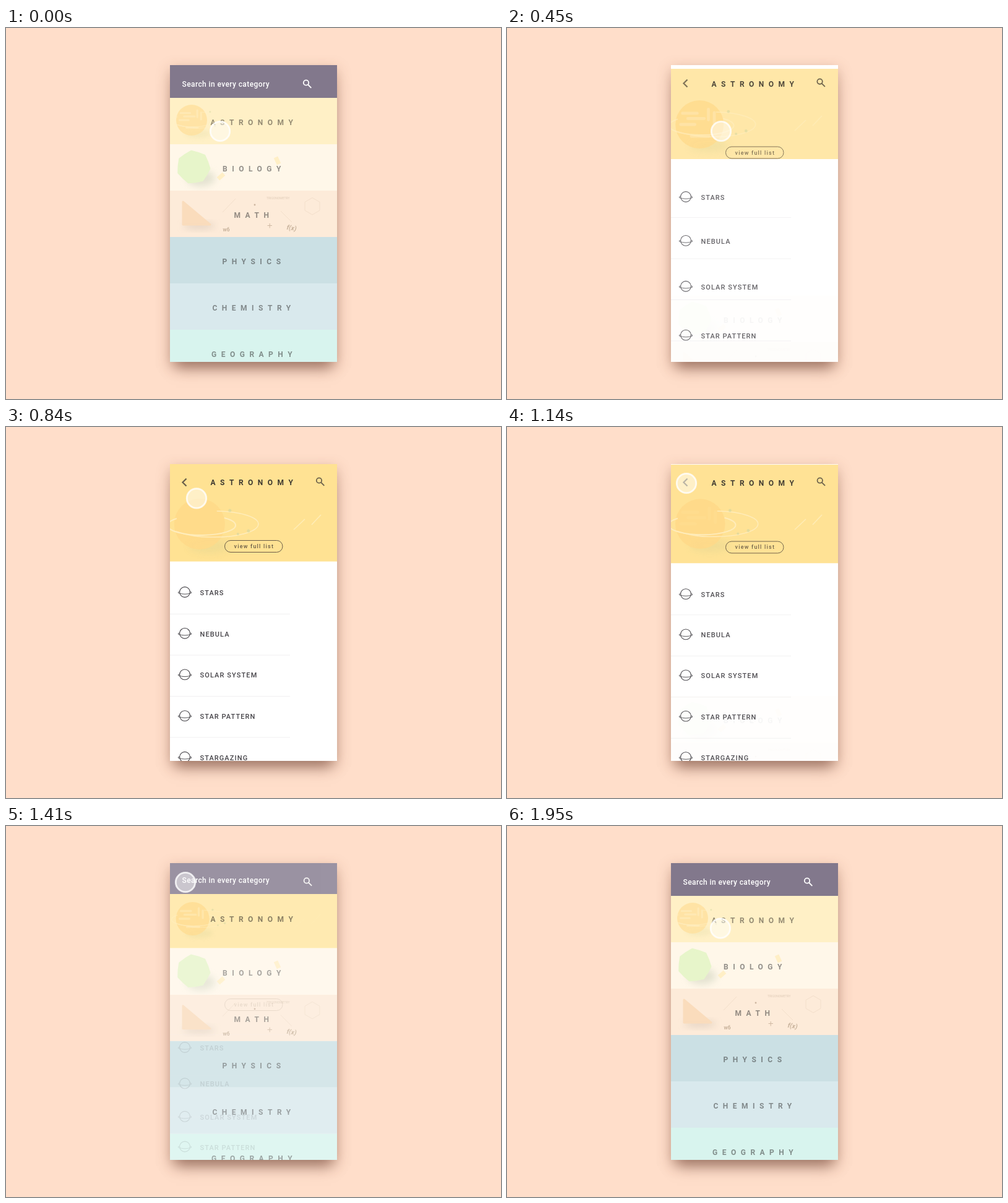
Animation, 800 px wide and 600 px high, one loop 1980 ms. Source, as an HTML page:

```html
<!DOCTYPE html>
<html lang="en">
<head>
<meta charset="utf-8">
<title>Category browser</title>
<style>
  html, body { margin: 0; width: 100%; height: 100%; overflow: hidden; background: #ffdeca; }
  #shadow {
    position: absolute; left: 265px; top: 60px; width: 270px; height: 480px;
    box-shadow: 0 7px 20px rgba(125, 70, 50, .34), 0 20px 22px -10px rgba(95, 55, 45, .5);
  }
  svg { position: absolute; left: 0; top: 0; display: block; }
  text { font-family: Roboto, "Liberation Sans", sans-serif; }
  .name { font-size: 12px; font-weight: 700; letter-spacing: 7.5px; }
  .item { font-size: 11px; font-weight: 500; letter-spacing: 1.1px; fill: #454348; }
  .math { font-weight: 700; fill: #c9b39c; }
</style>
</head>
<body>
<div id="shadow"></div>
<svg width="800" height="600" viewBox="0 0 800 600">
  <defs>
    <clipPath id="screen"><rect x="265" y="60" width="270" height="480"/></clipPath>
    <filter id="soft" x="-60%" y="-60%" width="220%" height="220%"><feGaussianBlur stdDeviation="6"/></filter>
  </defs>
  <g clip-path="url(#screen)">
    <rect x="265" y="60" width="270" height="480" fill="#fff"/>
    <g id="bar">
      <rect x="265" y="50" width="270" height="63" fill="#82788c"/>
      <text x="284.5" y="94.5" font-size="12" font-weight="500" letter-spacing=".4" fill="#fff">Search in every category</text>
    </g>
    <g id="rows"></g>
    <rect id="block" x="265" width="270" fill="#ffe293"/>
    <g clip-path="url(#blockClip)">
      <clipPath id="blockClip"><rect id="blockMask" x="265" width="270"/></clipPath>
      <g id="planet">
        <ellipse cx="16" cy="36" rx="34" ry="11" fill="#cfcf92" opacity=".3" filter="url(#soft)"/>
        <circle r="41" fill="#ffd988" opacity=".85"/>
        <g id="bands" stroke="#ffebbd" stroke-width="5" stroke-linecap="round">
          <path d="M-29-19H-4M-20-10H8M-32 0H-8M-14 20H16M15-26V-8M25-20V-2"/>
        </g>
        <g id="rings" fill="none" stroke="#fff0c6" stroke-width="2">
          <path d="M-37-9A55 16 0 1 0 40-10"/>
          <path d="M28-21A70 21 0 0 1 22 21Q-8 22-38 12" stroke-width="1.5"/>
        </g>
        <g fill="#d3d6a0" opacity=".7">
          <circle cx="49" cy="-22" r="2.5"/><circle cx="79" cy="11" r="2.5"/><circle cx="62" cy="16" r="2"/>
        </g>
      </g>
      <path id="meteors" d="M465 166L483 149M494 158L509 142" stroke="#fff0c2" stroke-width="1.5"/>
    </g>
    <text id="title" class="name" x="330.5" fill="#3f3a30">ASTRONOMY</text>
    <g id="list"></g>
    <g id="pill">
      <rect x="353.5" y="-9.5" width="93.5" height="19" rx="9.5" fill="none" stroke="#6a5d47"/>
      <text x="368.5" y="3" font-size="9" font-weight="500" letter-spacing="1.2" fill="#6a5d47">view full list</text>
    </g>
    <path id="back" d="M291.5 83.5L285.5 89.5L291.5 95.5" fill="none" stroke="#6b604b" stroke-width="2.3"/>
    <g id="search" fill="none" stroke-width="1.8">
      <circle cx="-2" cy="-2" r="4.2"/><path d="M1 1L6.3 6.3"/>
    </g>
    <circle id="cursor" r="15.7" fill="#fff" fill-opacity=".48" stroke="#fff" stroke-opacity=".8" stroke-width="2.8"/>
  </g>
</svg>
<script>
const LOOP = 1980, STEP = 30;
const $ = id => document.getElementById(id);
const set = (id, attrs) => { for (const k in attrs) $(id).setAttribute(k, attrs[k]); };
const move = (x, y) => `translate(${x} ${y})`;
const clamp = v => Math.max(0, Math.min(1, v));
const mix = (a, b, k) => a + (b - a) * k;

function ease(t, from, to) {
  const u = clamp((t - from) / (to - from));
  return u < .5 ? 4 * u ** 3 : 1 - 4 * (1 - u) ** 3;
}

// Smooth monotone curve through [time, value] keys, flat at both ends.
function track(t, keys) {
  const n = keys.length - 1;
  if (t <= keys[0][0]) return keys[0][1];
  if (t >= keys[n][0]) return keys[n][1];
  const slope = i => (keys[i + 1][1] - keys[i][1]) / (keys[i + 1][0] - keys[i][0]);
  const tangent = i => {
    if (i === 0 || i === n) return 0;
    const a = slope(i - 1), b = slope(i);
    return a * b <= 0 ? 0 : 2 * a * b / (a + b);
  };
  const i = keys.findIndex(k => k[0] > t) - 1;
  const [t0, v0] = keys[i], [t1, v1] = keys[i + 1];
  const d = t1 - t0, u = (t - t0) / d;
  return v0 + (v1 - v0) * u * u * (3 - 2 * u)
    + d * (tangent(i) * u * (1 - u) ** 2 - tangent(i + 1) * u * u * (1 - u));
}

// Values at rest, twice while opening, open, twice while closing, back at rest.
const cycle = (t, rest, a, b, open, c, d) => track(t, [
  [95, rest], [270, a], [450, b], [560, open],
  [1080, open], [1290, c], [1410, d], [1500, rest]]);

const virus = Array.from({ length: 14 }, (_, i) => {
  const angle = (-98 + i * 360 / 14) * Math.PI / 180, r = i % 2 ? 24 : 26;
  return `${303 + r * Math.cos(angle)},${225 + r * Math.sin(angle)}`;
}).join(' ');

const art = {
  BIOLOGY: `<ellipse cx="315" cy="243" rx="23" ry="13" fill="#d6d8c4" opacity=".65" filter="url(#soft)"/>
    <polygon points="${virus}" fill="#e7f5ca" stroke="#e7f5ca" stroke-width="3" stroke-linejoin="round"/>
    <path d="M343 244L352 236M436 209L441 220" stroke="#ffefc6" stroke-width="7"/>`,
  MATH: `<ellipse cx="312" cy="320" rx="26" ry="5" fill="#d8c8b8" opacity=".7" filter="url(#soft)"/>
    <path d="M286 281V318H330Z" fill="#fadcbc" stroke="#fadcbc" stroke-width="3" stroke-linejoin="round"/>
    <path d="M495 274.5L507 281.5V295L495 302L483 295V281.5ZM350 298L371 276M444 296L462 314" fill="none" stroke="#f3dfcb"/>
    <path d="M422.5 319.5H430M426.2 316V323.5" stroke="#cfb9a3"/>
    <circle cx="402" cy="286" r="1.4" fill="#cdb6a0"/>
    <text class="math" x="350.5" y="329" font-size="8.5">w6</text>
    <text class="math" x="453.5" y="327" font-size="10.5" font-style="italic" transform="rotate(8 462 324)">f(x)</text>
    <text x="421" y="277" font-size="5" fill="#dfcbb7">TRIGONOMETRY</text>`
};

$('rows').innerHTML = [
  ['BIOLOGY', 350, '#fff7e9'], ['MATH', 368.5, '#fdebd9'], ['PHYSICS', 349.5, '#cbe0e4'],
  ['CHEMISTRY', 333.5, '#d9e9ed'], ['GEOGRAPHY', 332, '#d8f4ee']
].map(([name, x, fill], i) => `<rect x="265" y="${188 + i * 75}" width="270" height="75" fill="${fill}"/>
  ${art[name] || ''}
  <text class="name" x="${x}" y="${232 + i * 75}" fill="#333" fill-opacity=".53">${name}</text>`).join('');

const items = ['STARS', 'NEBULA', 'SOLAR SYSTEM', 'STAR PATTERN', 'STARGAZING'];
$('list').innerHTML = items.map((name, i) => `
  <path id="line${i}" d="M265 ${302.5 + i * 66.5}H459" stroke="#f1f0f1"/>
  <g id="item${i}">
    <g fill="none" stroke="#454348" stroke-width="1.1">
      <circle cx="289" cy="-1" r="8.4"/>
      <path d="M281-2Q277-1 278.500 .5Q289 4 299.500 .5Q301-1 297-2" stroke-width=".9"/>
    </g>
    <text class="item" x="313.5" y="4">${name}</text>
  </g>`).join('');

function draw(t) {
  const p = ease(t, 96, 523) - ease(t, 1080, 1500);
  const home = cycle(t, 1, .6, .08, 0, .5, .8);
  const list = cycle(t, 0, .36, .82, 1, .53, .13);

  set('bar', { transform: move(0, cycle(t, 0, -23, -53, -63, -44, -3)), opacity: home });
  set('rows', { transform: move(0, 250 * p), opacity: home });

  const top = cycle(t, 113, 106, 66, 60, 69.5, 110);
  const bottom = track(t, [[95, 188], [270, 187], [450, 212], [560, 217.5],
    [1080, 217.5], [1200, 223], [1290, 219.5], [1410, 197.5], [1500, 188]]);
  const box = { y: top, height: bottom - top };
  set('block', { ...box, opacity: cycle(t, .52, .66, .8, 1, .83, .72) });
  set('blockMask', box);

  const r = cycle(t, 25, 27, 39, 41, 35, 27);
  set('planet', {
    transform: `${move(300 + (r - 25) * .8, 149 + (r - 25) * .5)} scale(${r / 41})`,
    opacity: cycle(t, .6, .65, .8, .9, .8, .7)
  });
  set('bands', { opacity: cycle(t, .55, .4, .5, 0, .45, .55) });
  set('rings', { opacity: cycle(t, .6, .6, .6, .9, .75, .6) });
  set('meteors', { opacity: cycle(t, 0, .25, .5, .8, .5, .1) });
  set('title', { y: mix(153, 89.5, p) + 4.3, opacity: cycle(t, .55, .8, .92, 1, .8, .6) });

  set('list', { opacity: list });
  const lineShift = cycle(t, 40, 28, 4, 0, 12, 35);
  items.forEach((_, i) => {
    const shift = cycle(t, 115, 84 + 5 * i, 6 * 1.7 ** i, 0, 29 * .6 ** i, 91 - 6 * i - 2.4 * i * i);
    set('item' + i, { transform: move(0, 268 + 66.7 * i + shift) });
    set('line' + i, { transform: move(0, lineShift) });
  });
  set('pill', { transform: move(0, cycle(t, 325, 297, 201.5, 193, 209, 289)), opacity: list });

  set('back', { opacity: cycle(t, 0, 0, .85, 1, .2, 0) });
  const tint = clamp(p * 1.6);
  set('search', {
    transform: move(mix(487, 508, p), mix(90.5, 88.5, p)),
    stroke: `rgb(${[110, 99, 76].map(c => Math.round(mix(255, c, tint)))})`
  });

  const travel = ease(t, 567, 1047) - ease(t, 1620, 2018);
  set('cursor', { cx: mix(346, 290, travel), cy: mix(167, 91, travel) });
}

const start = performance.now();
function tick() {
  const t = (performance.now() - start) % LOOP;
  draw(Math.floor(t / STEP) * STEP);
  requestAnimationFrame(tick);
}
tick();
</script>
</body>
</html>
```
